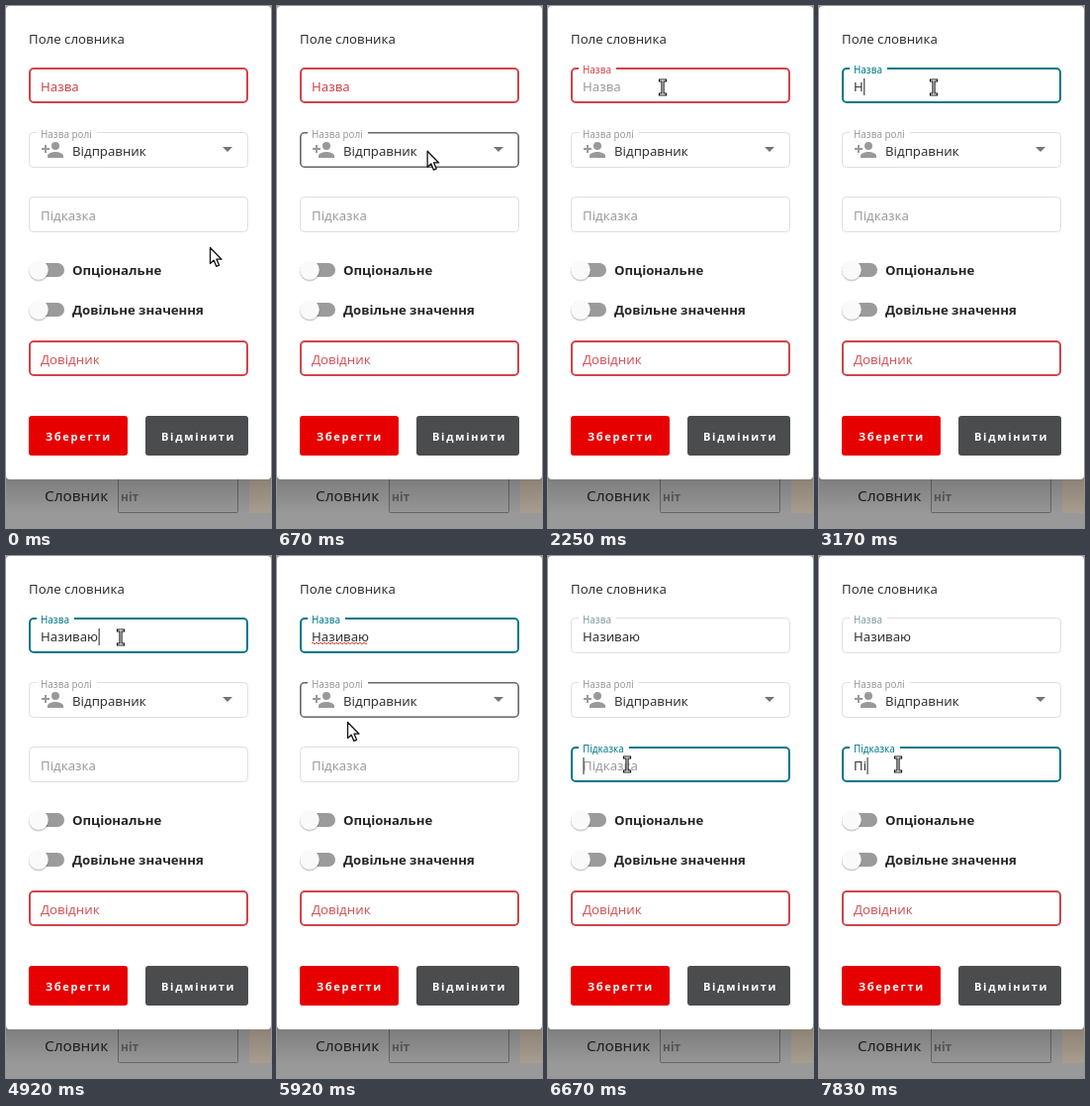
Animation, 268 px wide and 526 px high, one loop 8000 ms. Source, as an HTML page:

```html
<!DOCTYPE html>
<html lang="uk">
<head>
<meta charset="utf-8">
<style>
  html, body { margin: 0; width: 100%; height: 100%; overflow: hidden; background: #999; }
  svg { display: block; width: 100vw; height: 100vh; }
  text { font: 13.2px "Noto Sans", "Open Sans", sans-serif; fill: #333; white-space: pre; }
  .bold { font-weight: 700; fill: #252525; }
  .small { font-size: 9.9px; fill: #999; }
  .btn { font-size: 11px; font-weight: 700; letter-spacing: 1.7px; fill: #fff; }
  .hint { fill: #9c9c9c; }
  .box { fill: none; stroke: #dedede; }
  .error { stroke: #d0444b; stroke-width: 2; }
</style>
</head>
<body>
<svg viewBox="0 0 268 526" preserveAspectRatio="none">
  <defs>
    <linearGradient id="shade" x2="0" y2="1">
      <stop offset="0" stop-color="#000" stop-opacity=".2"/>
      <stop offset="1" stop-color="#000" stop-opacity="0"/>
    </linearGradient>
    <g id="switch">
      <rect x="26" y="-7" width="33" height="14" rx="7" fill="#9b9b9b"/>
      <circle cx="33" cy="1.2" r="10.3" fill="#000" opacity=".18"/>
      <circle cx="33" cy="0" r="9.8" fill="#fafafa"/>
    </g>
  </defs>

  <rect width="268" height="526" fill="#999"/>
  <rect x="246" y="470" width="22" height="41" fill="#a99e8f"/>
  <rect x="113.5" y="470.5" width="121" height="40" rx="1" fill="#979797" stroke="#666"/>
  <text x="39" y="499" style="font-size:15.3px;fill:#222">Словник</text>
  <text x="116" y="499" class="bold" style="font-size:12px;fill:#5c5c5c">ніт</text>
  <rect y="472" width="268" height="40" fill="url(#shade)"/>
  <rect width="268" height="477" rx="4" fill="#fff"/>

  <text x="23" y="38">Поле словника</text>

  <rect class="box" id="roleBox" x="23.5" y="127.5" width="221" height="35" rx="4"/>
  <rect x="31" y="125" width="61" height="5" fill="#fff"/>
  <text class="small" x="35" y="133">Назва ролі</text>
  <path transform="translate(35 133)" fill="#999" d="M15 12a4 4 0 1 0 0-8 4 4 0 0 0 0 8zM6 10V7H4v3H1v2h3v3h2v-3h3v-2zM15 14c-2.7 0-8 1.3-8 4v2h16v-2c0-2.7-5.3-4-8-4z"/>
  <text x="67" y="151">Відправник</text>
  <path d="M219 142h10l-5 5z" fill="#757575"/>

  <use href="#switch" y="266"/>
  <text class="bold" x="67" y="271">Опціональне</text>
  <use href="#switch" y="306"/>
  <text class="bold" x="67" y="311">Довільне значення</text>

  <rect class="box error" x="24" y="338" width="220" height="34" rx="4"/>
  <text x="35" y="361" style="fill:#d4565c">Довідник</text>

  <rect x="23" y="413" width="100" height="40" rx="3" fill="#e60000"/>
  <text class="btn" x="40" y="438">Зберегти</text>
  <rect x="141" y="413" width="104" height="40" rx="3" fill="#4a4c4e"/>
  <text class="btn" x="157" y="438">Відмінити</text>

  <g id="fields"></g>

  <path id="arrow" fill="#fff" stroke="#111" stroke-width="1.3" stroke-linejoin="round"
    d="M.5 .5V16.5L4.2 13.2 6.8 19.4 9.6 18.2 7 12.2H12Z"/>
  <g id="beam" fill="none" stroke-linecap="square">
    <path id="beamLine" d="M-2.5-7H2.5M0-7V7M-2.5 7H2.5" stroke="#111" stroke-width="3.2"/>
    <path d="M-2.5-7H2.5M0-7V7M-2.5 7H2.5" stroke="#fff" stroke-width="1"/>
  </g>
</svg>
<script>
const LOOP = 8000, STEP = 1000 / 12;
const RED = [208, 68, 75], TEAL = [0, 120, 136], GRAY = [222, 222, 222], MUTED = [128, 155, 166];
const NAME_CLICK = 1397, HINT_CLICK = 6495;
const $ = id => document.getElementById(id);
const clamp = v => Math.max(0, Math.min(1, v));
const easeOut = v => 1 - (1 - clamp(v)) ** 3;
const easeInOut = v => v * v * (3 - 2 * v);
const mix = (a, b, p) => `rgb(${a.map((v, i) => Math.round(v + (b[i] - v) * p))})`;

function add(parent, tag, attrs, text = '') {
  const el = document.createElementNS('http://www.w3.org/2000/svg', tag);
  set(el, attrs);
  el.textContent = text;
  return parent.appendChild(el);
}
function set(el, attrs) {
  for (const key in attrs) el.setAttribute(key, attrs[key]);
}
const show = (el, on) => set(el, { visibility: on ? 'visible' : 'hidden' });

// Outlined input with a floating label; y is the top edge.
function makeField(y, title) {
  const g = $('fields');
  return {
    y,
    box: add(g, 'rect', { class: 'box', rx: 4 }),
    notch: add(g, 'rect', { x: 31, y: y - 2, height: 5, fill: '#fff' }),
    hint: add(g, 'text', { class: 'hint', x: 35, y: y + 24 }, title),
    value: add(g, 'text', { x: 35, y: y + 24 }),
    label: add(g, 'text', {}, title),
    caret: add(g, 'rect', { y: y + 11, width: 1, height: 17, fill: '#222' })
  };
}

function drawField(f, s) {
  outline(f.box, f.y, s.border, s.thick);
  set(f.label, { transform: `translate(35 ${f.y + 24 - 18 * s.float}) scale(${1 - 0.25 * s.float})` });
  f.label.style.fill = s.color;
  set(f.notch, { width: s.float > 0 ? f.label.getComputedTextLength() * 0.75 + 9 : 0 });
  f.value.textContent = s.text;
  show(f.hint, s.float > 0 && !s.text);
  show(f.caret, s.caret);
  set(f.caret, { x: 35.5 + (s.text ? f.value.getComputedTextLength() : 0) });
}

function outline(box, y, color, w) {
  set(box, { x: 23 + w / 2, y: y + w / 2, width: 222 - w, height: 36 - w });
  box.style.stroke = color;
  box.style.strokeWidth = w;
}

const nameField = makeField(62, 'Назва');
const hintField = makeField(192, 'Підказка');

let wave = 'M35 88';
for (let x = 0; x < 14; x++) wave += 'q1 -2 2 0t2 0';
const squiggle = add($('fields'), 'path', { d: wave, fill: 'none', stroke: '#e03030', 'stroke-width': 0.9 });

const nameKeys = [2917, 3333, 3500, 4000, 4167, 4500, 4917];
const hintKeys = [7333, 7750];
const typed = (word, keys, t) => word.slice(0, keys.filter(k => t >= k - 1).length);
const blink = (t, start, keys) => {
  const last = Math.max(start, ...keys.filter(k => t >= k - 1));
  return (t - last) % 1000 < 500 || t < last;
};

// Pointer stops: time, x, y
const stops = [[0, 206, 243], [1170, 116, 82], [5583, 116, 82], [5917, 71, 167], [6333, 80, 210], [8000, 80, 210]];
function pointer(t) {
  const i = Math.max(1, stops.findIndex(s => t <= s[0]));
  const [t0, x0, y0] = stops[i - 1], [t1, x1, y1] = stops[i];
  const p = easeInOut(clamp((t - t0) / (t1 - t0)));
  return [x0 + (x1 - x0) * p, y0 + (y1 - y0) * p];
}

function render(t) {
  const [x, y] = pointer(t);
  const over = (top, pad = 0) => y > top && y < top + 36 + pad;
  const overName = over(62), overHint = over(192), overRole = over(127, 6);

  const valid = clamp((t - nameKeys[0] + 60) / 200);
  const blur = clamp((t - HINT_CLICK) / 150);
  const nameOn = t >= NAME_CLICK && t < HINT_CLICK;
  drawField(nameField, {
    float: easeOut((t - NAME_CLICK) / 200),
    border: blur ? mix(TEAL, GRAY, blur) : mix(RED, TEAL, valid),
    color: blur ? mix(TEAL, MUTED, blur) : mix(RED, TEAL, valid),
    thick: blur ? 1 : 2,
    text: typed('Називаю', nameKeys, t),
    caret: nameOn && blink(t, NAME_CLICK, nameKeys)
  });
  show(squiggle, t >= 5749 && nameOn);

  const hintOn = t >= HINT_CLICK;
  drawField(hintField, {
    float: easeOut((t - HINT_CLICK) / 200),
    border: hintOn ? mix(GRAY, TEAL, 1) : overHint ? '#666' : mix(GRAY, GRAY, 0),
    color: hintOn ? mix(TEAL, TEAL, 1) : '#9c9c9c',
    thick: hintOn ? 2 : overHint ? 1.6 : 1,
    text: typed('Пі', hintKeys, t),
    caret: hintOn && blink(t, HINT_CLICK, hintKeys)
  });

  outline($('roleBox'), 127, overRole ? '#666' : '#dedede', overRole ? 1.6 : 1);

  const inText = overName || overHint;
  show($('arrow'), !inText);
  show($('beam'), inText);
  set($('arrow'), { transform: `translate(${x} ${y})` });
  set($('beam'), { transform: `translate(${x} ${y})` });
}

function tick(now) {
  const t = now % LOOP;
  render(Math.floor((t + 4) / STEP) * STEP);
  requestAnimationFrame(tick);
}
requestAnimationFrame(tick);
</script>
</body>
</html>
```
